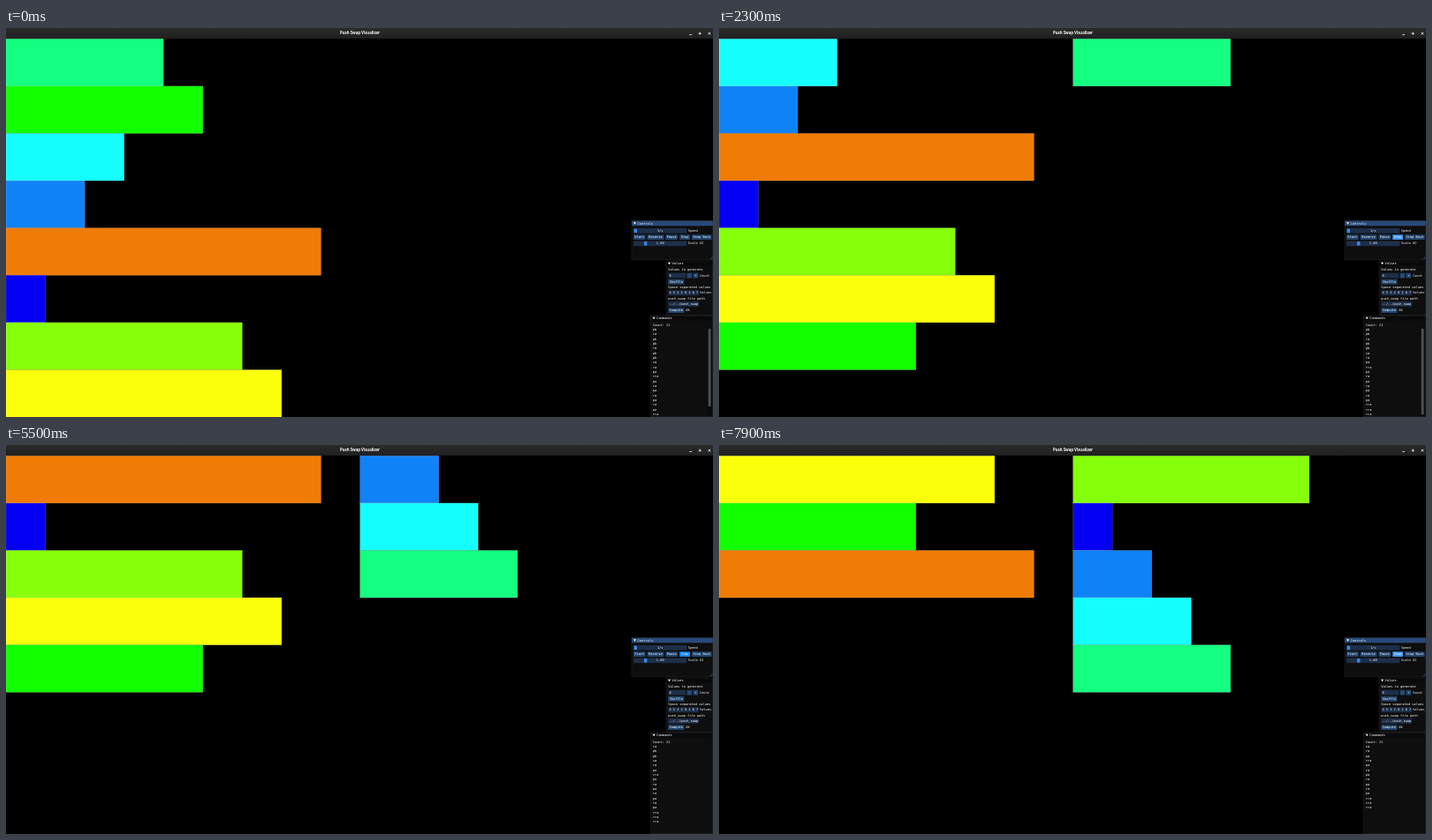
An HTML page with a canvas that plays this animation: 800 px wide and 441 px high, repeating every 8000 ms.

```html
<!DOCTYPE html>
<html lang="en">
<head>
<meta charset="utf-8">
<title>Push Swap Visualizer</title>
<style>
html, body { margin: 0; width: 100%; height: 100%; overflow: hidden; background: #000; }
canvas { display: block; width: 800px; height: 441px; }
</style>
</head>
<body>
<canvas id="stage"></canvas>
<script>
const canvas = document.getElementById('stage');
const ctx = canvas.getContext('2d');
const ratio = window.devicePixelRatio || 1;
canvas.width = 800 * ratio;
canvas.height = 441 * ratio;
ctx.scale(ratio, ratio);

const LOOP = 8000;
const HOVER_AT = 600;
const PRESS = 100;
const STEPS = [1100, 2000, 3000, 4100, 5600, 6700, 7600];
const VALUES = [4, 5, 3, 2, 8, 1, 6, 7];
const COMMANDS = ('pb ra pb pb ra pb pb sa ra pa rra pa ra pa ra pa ra pa ' +
  'rra rra rra').split(' ');
const COLORS = ['#0400f4', '#1082f8', '#16ffff', '#14ff82', '#12ff00',
  '#86ff0a', '#fbff0a', '#f07c05'];

const TOP = 12.3, ROW = 53.6, UNIT = 44.55;
const MONO = '3.64px "DejaVu Sans Mono", monospace';
const FRAME = '#1d2e48', BUTTON = '#23456d', GRAB = '#3d85e0';
const HOVERED = '#4296fa', PRESSED = '#0f87fa';

function box(x, y, right, bottom, color) {
  ctx.fillStyle = color;
  ctx.fillRect(x, y, right - x, bottom - y);
}

function text(str, x, y, align = 'left', font = MONO) {
  ctx.font = font;
  ctx.textAlign = align;
  ctx.textBaseline = 'middle';
  ctx.fillStyle = '#fff';
  ctx.fillText(str, x, y);
}

function line(...points) {
  ctx.beginPath();
  for (let i = 0; i < points.length; i += 4) {
    ctx.moveTo(points[i], points[i + 1]);
    ctx.lineTo(points[i + 2], points[i + 3]);
  }
  ctx.strokeStyle = '#fff';
  ctx.lineWidth = 0.8;
  ctx.stroke();
}

function triangle(color, ...p) {
  ctx.beginPath();
  ctx.moveTo(p[0], p[1]);
  ctx.lineTo(p[2], p[3]);
  ctx.lineTo(p[4], p[5]);
  ctx.fillStyle = color;
  ctx.fill();
}

function panel(title, x, y, bottom, titleColor) {
  box(x, y, 800, bottom, '#0e0e0e');
  box(x, y, 800, y + 5.8, titleColor);
  ctx.strokeStyle = '#303036';
  ctx.lineWidth = 0.4;
  ctx.strokeRect(x, y, 799.8 - x, bottom - y);
  triangle('#fff', x + 2, y + 1.7, x + 5, y + 1.7, x + 3.5, y + 4.3);
  text(title, x + 6.6, y + 3.1);
}

function button(label, x, y, right, color = BUTTON) {
  box(x, y, right, y + 5.7, color);
  text(label, (x + right) / 2, y + 2.9, 'center');
}

function input(value, x, y, right) {
  box(x, y, right, y + 5.7, FRAME);
  ctx.save();
  ctx.beginPath();
  ctx.rect(x, y, right - x, 5.7);
  ctx.clip();
  text(value, x + 1.3, y + 2.9);
  ctx.restore();
}

function slider(value, label, y, grab) {
  box(710, y, 770.3, y + 5.7, FRAME);
  box(grab, y + 0.6, grab + 3.4, y + 5.1, GRAB);
  text(value, 740.2, y + 2.9, 'center');
  text(label, 771.8, y + 2.9);
}

function bars(stack, left) {
  stack.forEach((value, i) => {
    const y = TOP + i * ROW;
    box(left, y, left + value * UNIT, y + ROW, COLORS[value - 1]);
    ctx.strokeStyle = 'rgba(255,255,255,.3)';
    ctx.lineWidth = 0.5;
    ctx.strokeRect(left, y, value * UNIT, ROW);
  });
}

function titleBar() {
  const shade = ctx.createLinearGradient(0, 0, 0, 12);
  shade.addColorStop(0, '#2b2b2b');
  shade.addColorStop(1, '#202020');
  box(0, 0, 800, 12, shade);
  text('Push Swap Visualizer', 400.5, 6.3, 'center', 'bold 4.3px "Open Sans", sans-serif');
  line(773.3, 7.6, 776, 7.6, 783.6, 6.2, 786.8, 6.2, 785.2, 4.6, 785.2, 7.8);
  line(794.6, 4.9, 797.2, 7.5, 797.2, 4.9, 794.6, 7.5);
}

function controls(stepColor) {
  panel('Controls', 708, 218.5, 262.6, '#294a7a');
  slider('1/s', 'Speed', 227, 710.6);
  button('Start', 710, 234.3, 723.6);
  button('Reverse', 725.6, 234.3, 744.4);
  button('Pause', 746.4, 234.3, 760);
  button('Step', 762.2, 234.3, 774, stepColor);
  button('Step Back', 776, 234.3, 798.6);
  slider('1.00', 'Scale UI', 241.5, 722);
  triangle('#1b2f47', 799.6, 258.4, 799.6, 262.4, 795.6, 262.4);
}

function values() {
  panel('Values', 747, 264, 325.8, '#0a0a0a');
  text('Values to generate', 749.2, 274.4);
  input('8', 749.2, 277.8, 769.3);
  button('-', 770.5, 277.8, 776.2);
  button('+', 777.5, 277.8, 783.2);
  text('Count', 785, 280.7);
  button('Shuffle', 749.2, 284.9, 767.4);
  text('Space separated values', 749.2, 294.2);
  input(VALUES.join(' '), 749.2, 297.4, 784);
  text('Values', 785, 300.3);
  text('push_swap file path', 749.2, 306.8);
  input('../../push_swap', 749.2, 310.1, 784);
  button('Compute', 749.2, 317.3, 767.4);
  text('OK', 769.2, 320.2);
}

function commands(list) {
  const pitch = 5.33, y = 340.8, view = 99.4;
  panel('Commands', 729.6, 326, 440.8, '#0a0a0a');
  text('Count: ' + COMMANDS.length, 731.8, 337);
  ctx.save();
  ctx.beginPath();
  ctx.rect(730, 339, 70, 101.3);
  ctx.clip();
  list.forEach((name, i) => text(name, 731.8, 342.2 + i * pitch));
  const content = list.length * pitch;
  if (content > view) {
    box(793.6, y - 0.5, 798.6, y + view, '#090909');
    box(794.6, y, 797.6, y + view * view / content, '#4f4f4f');
  }
  ctx.restore();
}

function draw(t) {
  const done = STEPS.filter(at => t >= at).length;
  const a = [...VALUES], b = [];
  for (const name of COMMANDS.slice(0, done)) {
    if (name === 'pb') b.unshift(a.shift());
    else a.push(a.shift());
  }
  const pressed = STEPS.some(at => t >= at - PRESS && t < at);
  box(0, 0, 800, 441, '#000');
  bars(a, 0);
  bars(b, 400.6);
  titleBar();
  controls(pressed ? PRESSED : t >= HOVER_AT ? HOVERED : BUTTON);
  values();
  commands(COMMANDS.slice(done));
}

const start = performance.now();
function tick(now) {
  draw(Math.max(0, now - start) % LOOP);
  requestAnimationFrame(tick);
}
draw(0);
requestAnimationFrame(tick);
</script>
</body>
</html>
```
